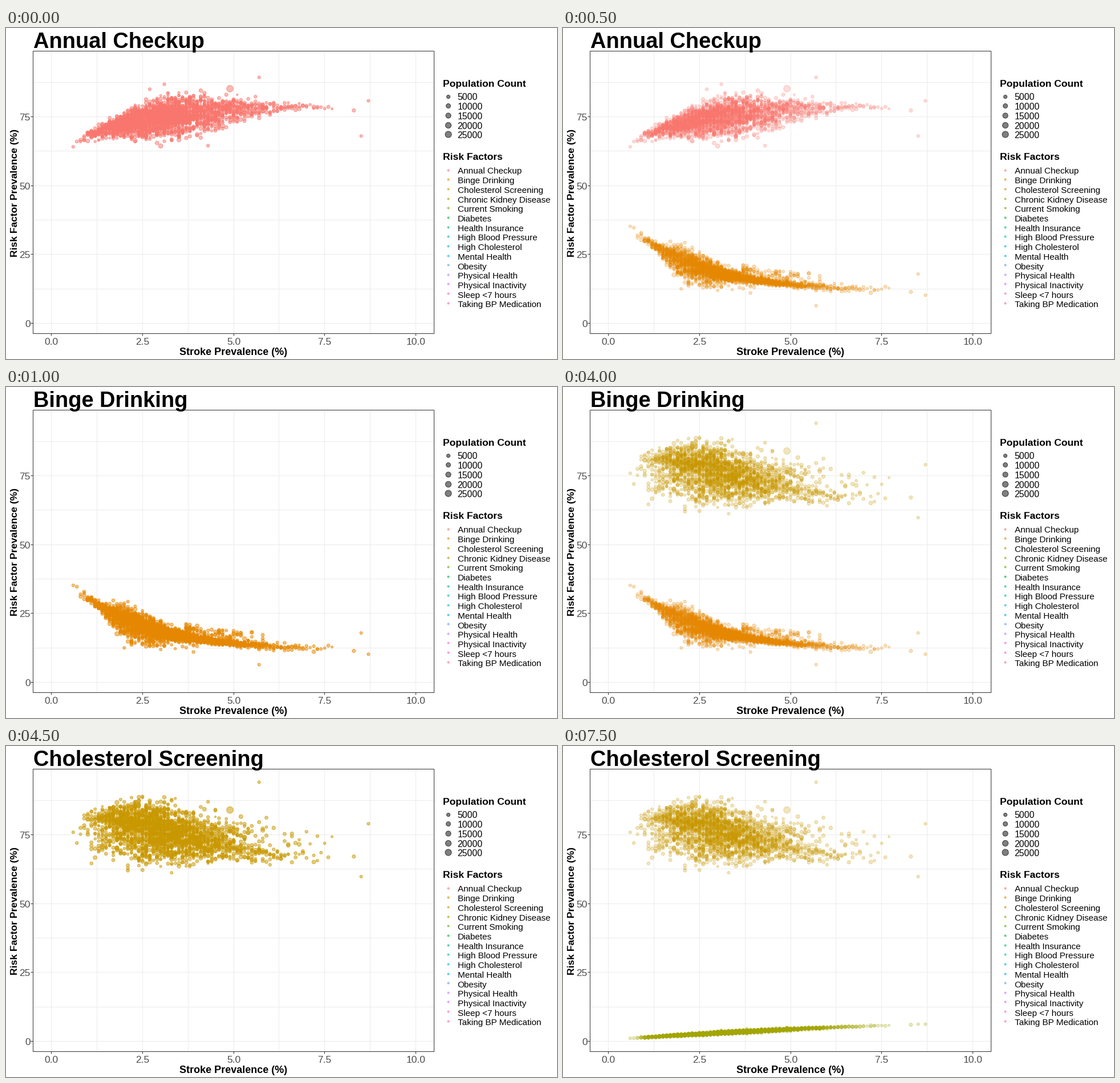
A matplotlib script for the animation above (8 s loop, 966 by 580 pixels).

```python
import numpy as np
import matplotlib.pyplot as plt
from matplotlib.animation import FuncAnimation
from matplotlib.patches import Rectangle

W, H, DPI = 966, 580, 100
PT = 72 / DPI                      # points per pixel
STEP, FRAMES, HOLD = 500, 16, 7    # ms per step, steps per loop, steps per factor

FACTORS = ["Annual Checkup", "Binge Drinking", "Cholesterol Screening",
           "Chronic Kidney Disease", "Current Smoking", "Diabetes",
           "Health Insurance", "High Blood Pressure", "High Cholesterol",
           "Mental Health", "Obesity", "Physical Health",
           "Physical Inactivity", "Sleep <7 hours", "Taking BP Medication"]

# landmark tracts: stroke, checkup, binge, screening, population
LANDMARKS = np.array([(4.9, 85.2, 14.2, 84.0, 28500),
                      (5.7, 89.3, 6.4, 94.1, 3400),
                      (8.3, 77.3, 11.4, 67.1, 5000),
                      (8.5, 68.0, 17.9, 59.8, 3200),
                      (8.7, 80.8, 10.2, 79.0, 3400)])

rng = np.random.default_rng(12)


def hue(i, n=len(FACTORS), light=65, chroma=100):
    """Evenly spaced hue on the CIE LUV wheel, as sRGB."""
    h = np.radians(15 + 360 * i / n)
    u = chroma * np.cos(h) / (13 * light) + 0.19784
    v = chroma * np.sin(h) / (13 * light) + 0.46834
    y = ((light + 16) / 116) ** 3
    x, z = 9 * y * u / (4 * v), y * (12 - 3 * u - 20 * v) / (4 * v)
    rgb = np.clip([3.2405 * x - 1.5371 * y - 0.4985 * z,
                   -0.9693 * x + 1.8760 * y + 0.0416 * z,
                   0.0556 * x - 0.2040 * y + 1.0572 * z], 0, 1)
    return tuple(np.where(rgb > 0.0031, 1.055 * rgb ** (1 / 2.4) - 0.055,
                          12.92 * rgb))


def px(x):
    return 79.5 + 63.9 * np.asarray(x)


def py(y):
    return 517.4 - 4.825 * np.asarray(y)


def radius(pop):
    return 1.6 + 4.2 * np.sqrt(np.clip((np.asarray(pop) - 2000) / 26000, 0, 1))


def bump(x, centre, width):
    return np.exp(-((x - centre) / width) ** 2)


def cloud(mid, up, low):
    """Bell-shaped spread round a curve, with a few stragglers."""
    n = rng.uniform(-1, 1, (3, len(mid))).sum(0)
    n *= np.where(rng.random(len(mid)) < 0.03, 1.6, 1)
    return mid + n * np.where(n > 0, up, low)


def some(x, lo, hi, share):
    return (x > lo) & (x < hi) & (rng.random(len(x)) < share)


def make_data():
    cols = np.arange(5, 78) / 10
    z = np.log(cols / 2.9) / np.where(cols < 2.9, 0.48, 0.32)
    count = 85 * np.exp(-z ** 2 / 2) + rng.random(len(cols))
    x = np.repeat(cols, count.astype(int))
    rng.shuffle(x)
    pop = 3900 * np.exp(rng.normal(0, 0.35, len(x)))

    wide = bump(x, 3.6, 2)
    checkup = cloud(79 - 19 * np.exp(-x / 1.9), 0.4 + 2.7 * wide, 0.4 + 3.5 * wide)

    binge = cloud(11.8 + 32 * np.exp(-x / 1.9),
                  0.6 + 1.6 * bump(x, 2.3, 0.9), 0.6 + 2.6 * bump(x, 2.2, 0.9))
    binge += some(x, 3.6, 6.2, 0.13) * rng.uniform(1.8, 4.4, len(x))
    binge -= some(x, 2.5, 4.8, 0.02) * rng.uniform(3, 5, len(x))

    screening = cloud(66 + 23 * x * np.exp(-x / 1.6),
                      np.minimum(1.6 + 0.95 * x, 4.6), 2 + 4.2 * bump(x, 2, 2.2))

    far = LANDMARKS.T
    x = np.r_[x, far[0]]
    spread = 0.06 + 0.2 * bump(x, 4, 2)
    kidney = cloud(0.5 + 0.93 * x - 0.032 * x ** 2, spread, spread)
    ys = [np.r_[checkup, far[1]], np.r_[binge, far[2]],
          np.r_[screening, far[3]], kidney]
    return x, [np.round(y, 1) for y in ys], np.r_[pop, far[4]]


fig = plt.figure(figsize=(W / DPI, H / DPI), dpi=DPI, facecolor="white")
ax = fig.add_axes([0, 0, 1, 1])
ax.set_xlim(0, W)
ax.set_ylim(H, 0)
ax.axis("off")


def label(x, y, text, size, color="black", **kw):
    return ax.text(x, y, text, fontsize=size * PT, color=color, va="baseline",
                   family="Liberation Sans", zorder=9, **kw)


def tint(pts, rgb, alpha):
    pts.set_facecolor((*rgb, alpha))
    pts.set_edgecolor((*rgb, 1.3 * alpha))


def dots(x, y, r, rgb):
    pts = ax.scatter(x, y, s=(2 * np.asarray(r) * PT) ** 2,
                     linewidths=PT, zorder=4)
    tint(pts, rgb, 0.5)
    return pts


def rule(xs, ys, color, z):
    ax.plot(xs, ys, color=color, lw=PT, zorder=z, solid_capstyle="butt",
            snap=False)


def mid_pixel(v):
    return np.floor(v) + 0.5


# panel
L, R, T, B = 47.5, 750.5, 40.5, 535.5
for v in np.arange(0, 10.1, 1.25):
    x = mid_pixel(px(v))
    rule([x, x], [T, B], "#EBEBEB", 1)
    if v % 2.5 == 0:
        rule([x, x], [B, B + 4], "#333333", 5)
        label(x, 555, f"{v:.1f}", 17.4, "#4D4D4D", ha="center")
for v in np.arange(0, 90, 12.5):
    y = mid_pixel(py(v))
    rule([L, R], [y, y], "#EBEBEB", 1)
    if v % 25 == 0:
        rule([L - 4, L], [y, y], "#333333", 5)
        label(43, y + 6.5, f"{v:.0f}", 17.4, "#4D4D4D", ha="right")
ax.add_patch(Rectangle((L, T), R - L, B - T, fill=False, ec="#333333",
                       lw=PT, zorder=6, snap=False))
label(398.5, 573, "Stroke Prevalence (%)", 18, weight="bold", ha="center")
label(20, 288.5, "Risk Factor Prevalence (%)", 17.5, weight="bold",
      ha="center", rotation=90, rotation_mode="anchor")

# legends
label(765.5, 103, "Population Count", 17.5, weight="bold")
for i in range(5):
    pop = 5000 * (i + 1)
    dots([775], [119.7 + 16.65 * i], radius([pop]), (0, 0, 0))
    label(791.5, 126.5 + 16.7 * i, str(pop), 15.8)
label(765.5, 231, "Risk Factors", 17.5, weight="bold")
for i, name in enumerate(FACTORS):
    dots([774.7], [248.8 + 16.64 * i], [1.5], hue(i))
    label(791.5, 255.5 + 16.7 * i, name, 15.3)

# data
stroke, prevalence, people = make_data()
clouds = [dots(px(stroke), py(y), radius(people), hue(k))
          for k, y in enumerate(prevalence)]
title = label(47.5, 35, "", 38, weight="bold")


def update(i):
    now, part = divmod(i + HOLD - 2, HOLD)
    fading = part == HOLD - 1
    for k, pts in enumerate(clouds):
        pts.set_visible(k == now or (fading and k == now + 1))
        tint(pts, hue(k), 0.25 if fading else 0.5)
    title.set_text(FACTORS[now])
    return [*clouds, title]


anim = FuncAnimation(fig, update, frames=FRAMES, interval=STEP,
                     repeat=True, repeat_delay=0, blit=False)
plt.show()
```
